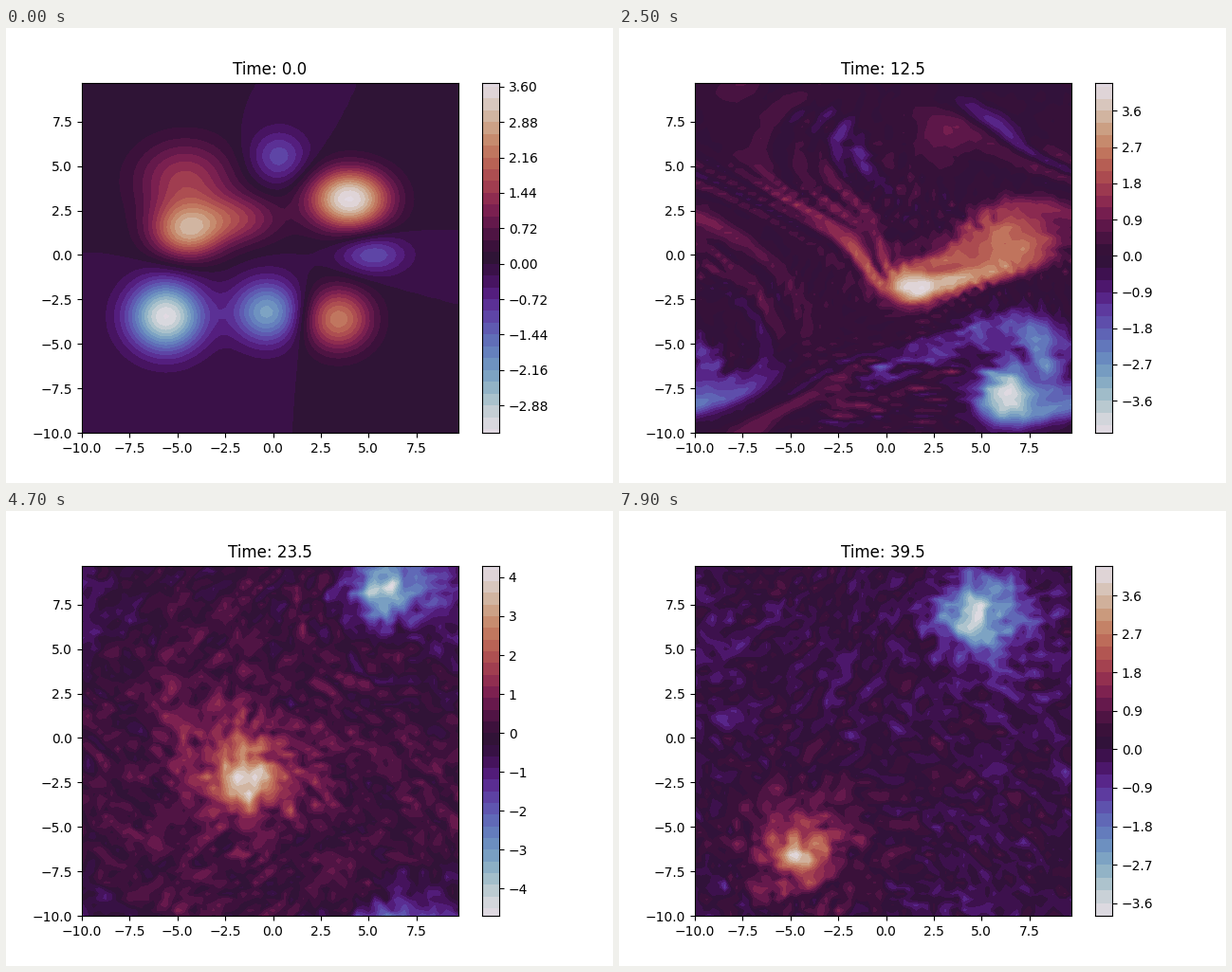
These frames come from a looping animation (640 by 480 pixels, 8000 ms). A matplotlib script:

```python
import numpy as np
import matplotlib.pyplot as plt
from matplotlib.animation import FuncAnimation
from matplotlib.ticker import MaxNLocator

N, L, NU = 64, 20.0, 0.001
FRAMES, FRAME_DT, SUBSTEPS = 80, 0.5, 10
DT = FRAME_DT / SUBSTEPS
H = L / N

x = np.arange(N) * H - L / 2
X, Y = np.meshgrid(x, x)

kx = 2 * np.pi / L * np.fft.rfftfreq(N, 1 / N)
ky = 2 * np.pi / L * np.fft.fftfreq(N, 1 / N)
K2 = kx[None, :] ** 2 + ky[:, None] ** 2
K2[0, 0] = 1

# waypoints of the two surviving vortices: time, x, y (y unwrapped)
RED = [(8, 3.7, 0), (17, -1.6, -3.3), (23.5, -1.6, -2.3),
       (29.5, -2, -6.5), (39.5, -4.9, -6.4)]
BLUE = [(8, 7.3, -5.3), (17, 6, -11.6), (29.5, 6.2, -12.5), (39.5, 4.6, -13.3)]


def ramp(t, a, b):
    return min(max((t - a) / (b - a), 0), 1)


def wrap(d):
    return (d + L / 2) % L - L / 2


def ddx(f):
    return (np.roll(f, -1, 1) - np.roll(f, 1, 1)) / (2 * H)


def ddy(f):
    return (np.roll(f, -1, 0) - np.roll(f, 1, 0)) / (2 * H)


def laplacian(f):
    return (np.roll(f, 1, 0) + np.roll(f, -1, 0) + np.roll(f, 1, 1)
            + np.roll(f, -1, 1) - 4 * f) / H ** 2


def blob(cx, cy, strength, spread=3.5, aspect=1.0):
    r2 = (X - cx) ** 2 / aspect + (Y - cy) ** 2 * aspect
    return strength * np.exp(-r2 / spread)


def start():
    return (blob(-4.5, 1.35, 2.55, 2.8, 1.2)        # large warm patch
            + blob(-4.6, 4.2, 1.5, 5.5, 1.15)
            + blob(-1.8, 2.0, 1.3, 2.8, 1.6)
            + blob(4.0, 3.15, 3.66, 3.3, 1.25)
            + blob(3.4, -3.6, 2.35, 3.0)
            + blob(-5.6, -3.45, -3.42, 3.8)         # cold vortices
            + blob(-0.3, -3.2, -2.3, 3.1)
            + blob(0.3, 5.5, -1.15, 2.3)
            + blob(5.2, 0.05, -1.25, 2.0, 1.6))


def rate(w, steer):
    """Vorticity equation with a weak steering stream function."""
    psi = np.fft.irfft2(-np.fft.rfft2(w) / K2, s=(N, N)) + steer
    return ddy(psi) * ddx(w) - ddx(psi) * ddy(w) + NU * laplacian(w)


def offsets(path, t):
    times, px, py = zip(*path)
    dx = wrap(X - np.interp(t, times, px))
    dy = wrap(Y - np.interp(t, times, py))
    return dx, dy, dx ** 2 + dy ** 2


def steering(w, path, sign, t):
    dx, dy, r2 = offsets(path, t)
    mass = np.maximum(sign * w - 1, 0) ** 2 * np.exp(-r2 / 20)
    total = mass.sum() + 1e-9
    v = -1.5 * np.array([(mass * dx).sum(), (mass * dy).sum()]) / total
    v *= ramp(t, 6, 8) * min(1, 1.5 / (np.hypot(*v) + 1e-9))
    return (v[1] * dx - v[0] * dy) * np.exp(-r2 / 16)


def cores(t):
    """The two surviving vortices, each a sharp core in a wide halo."""
    red, blue = offsets(RED, t)[2], offsets(BLUE, t)[2]
    gain = 1.25 - 0.25 * ramp(t, 17, 28)
    return gain * (2.7 * np.exp(-red / 1.8) + 1.1 * np.exp(-red / 14)
                   - 1.4 * np.exp(-blue / 1.2) - 2.3 * np.exp(-blue / 6.5))


def settle(w, t):
    """Feed the cores and calm the rest."""
    base = cores(t)
    late = ramp(t, 9, 20)
    pull = 1.5 * ramp(t, 7, 8) * (base / 4) ** 2 + 0.15 * late
    band = 1.5 - 0.7 * ramp(t, 15, 26)
    held = np.clip(w, base - band, base + band)
    return w + DT * (pull * (base - w) + 1.5 * late * (held - w))


def speckle(rng, t):
    """Two-cell noise, stronger inside the cores."""
    n = rng.normal(size=(N, N))
    n = n + np.roll(n, 1, 0)
    n = (n + np.roll(n, 1, 1)) / 2
    return ramp(t, 10, 18) * (0.13 + 0.08 * abs(cores(t))) * n


def step(w, t):
    steer = 0
    if t > 6:
        steer = steering(w, RED, 1, t) + steering(w, BLUE, -1, t)
    a = rate(w, steer)
    b = rate(w + DT / 2 * a, steer)
    c = rate(w + DT / 2 * b, steer)
    d = rate(w + DT * c, steer)
    w = w + DT / 6 * (a + 2 * b + 2 * c + d)
    if t > 7:
        w = settle(w, t)
    return np.clip(w, -5.2, 5.2)


def simulate():
    rng = np.random.default_rng(4)
    w = start()
    fields = [w]
    for n in range(1, (FRAMES - 1) * SUBSTEPS + 1):
        t = n * DT
        w = step(w, t)
        if n % SUBSTEPS == 0:
            if t > 10:
                w = w + speckle(rng, t)
            fields.append(w)
    return fields


def scale(w):
    """Contour edges and colour bar ticks for one field."""
    lo, hi = w.min(), w.max()
    lev = np.round(MaxNLocator(101, min_n_ticks=1).tick_values(lo, hi), 8) + 0.0
    first = max(np.searchsorted(lev, lo, 'right') - 1, 0)
    last = min(np.searchsorted(lev, hi), len(lev) - 1)
    lev = lev[first:last + 1]
    zero = np.argmin(abs(lev))
    band = max(1, round(len(lev) / 31))
    skip = -(-len(lev) // 10)
    edges = np.unique(np.r_[lev[0], lev[zero % band::band], lev[-1]])
    return edges, lev[zero % skip::skip]


fields = simulate()

fig = plt.figure(figsize=(6.4, 4.8), dpi=100)
ax = fig.add_axes([0.125, 0.11, 0.62, 0.77])
cax = fig.add_axes([501.6 / 640, 0.11, 18.48 / 640, 0.77])


def draw(i):
    w = fields[i]
    edges, ticks = scale(w)
    look = dict(cmap='twilight', vmin=edges[0], vmax=edges[-1])
    ax.clear()
    ax.contourf(X, Y, w, levels=edges, **look)
    ax.set_title(f'Time: {i * FRAME_DT:.1f}')

    cax.clear()
    mids = (edges[1:] + edges[:-1]) / 2
    cax.pcolormesh([0, 1], edges, mids[:, None], **look)
    cax.set_xticks([])
    cax.yaxis.tick_right()
    cax.set_yticks(ticks)
    cax.set_ylim(edges[0], edges[-1])
    return []


anim = FuncAnimation(fig, draw, frames=FRAMES, interval=100,
                     init_func=lambda: draw(0), repeat=True, repeat_delay=0)
plt.show()
```
